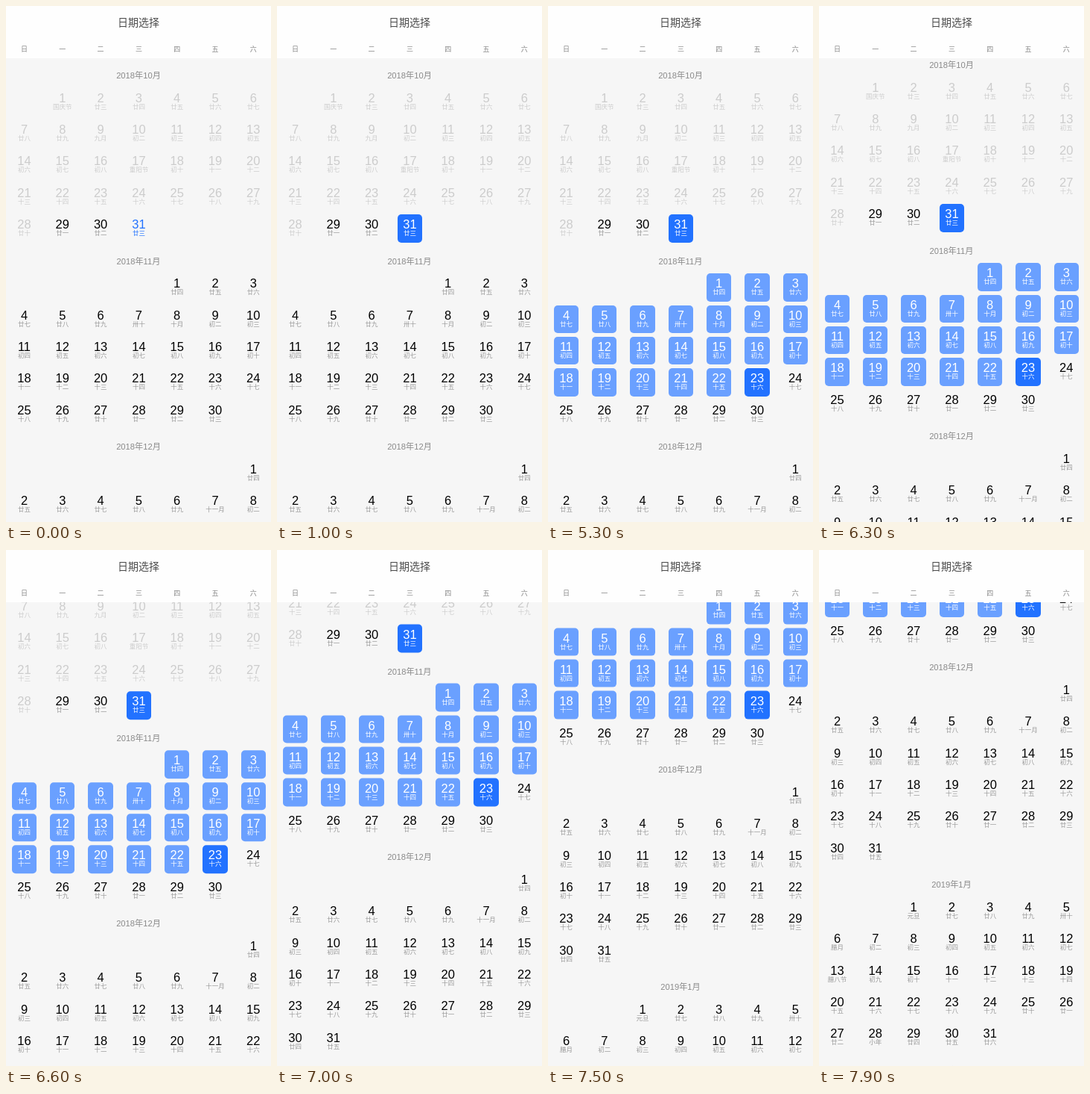
An HTML page that plays this animation: 356x691 px, repeating every 8 s.

```html
<!DOCTYPE html>
<html lang="zh-CN">
<head>
<meta charset="utf-8">
<style>
  html, body { margin: 0; width: 100%; height: 100%; overflow: hidden; background: #f6f6f6; }
  body { position: relative; font-family: "Liberation Sans", "Noto Sans CJK SC", "Noto Sans CJK", sans-serif; }
  div { position: absolute; text-align: center; white-space: nowrap; }
  #header { left: 0; top: 0; width: 356px; height: 70px; background: #fefefe; }
  #title { left: 0; width: 356px; top: 12px; font-size: 14px; line-height: 21px; color: #4c4c4c; }
  .weekday { width: 40px; top: 50px; font-size: 9px; line-height: 16px; color: #858585; }
  .month { left: 0; width: 356px; font-size: 11.2px; line-height: 16px; color: #8a8a8a; }
  .day { width: 33.4px; height: 37.5px; border-radius: 5px; color: #000; }
  .day b, .day i { position: absolute; left: -10px; right: -10px; font-weight: 400; font-style: normal; }
  .day b { top: 4px; font-size: 16.5px; line-height: 19px; }
  .day i { top: 19px; font-size: 8.5px; line-height: 12px; color: #999; }
  .past, .past i { color: #ccc; }
  .today, .today i { color: #2272ff; }
  .range { background: #6aa0ff; }
  .end { background: #2272ff; }
  .range, .range i, .end, .end i { color: #fff; }
</style>
</head>
<body>
<div id="list"></div>
<div id="header"><div id="title">日期选择</div></div>
<script>
const LOOP = 8000, STEP = 100, TODAY = 30, LAST = 53;
const COL = 51.3, ROW = 42.4, FIRST_X = 24.5;
const list = document.getElementById('list');
const header = document.getElementById('header');

function add(parent, className, left, top, html) {
  const el = document.createElement('div');
  el.className = className;
  if (left !== null) el.style.left = left + 'px';
  if (top !== null) el.style.top = top + 'px';
  el.innerHTML = html;
  parent.append(el);
  return el;
}

// Lunar day names, counted from lunar day 22 on 1 October 2018
const holidays = { 0: '国庆节', 16: '重阳节', 92: '元旦', 104: '腊八节', 119: '小年' };
const lunarMonths = [['八月', 29], ['九月', 30], ['十月', 29], ['十一月', 30], ['腊月', 30], ['正月', 29]];
function lunarName(index) {
  if (holidays[index]) return holidays[index];
  let n = index + 22, m = 0;
  while (n > lunarMonths[m][1]) n -= lunarMonths[m++][1];
  if (n === 1) return lunarMonths[m][0];
  return (n <= 10 ? '初' : '初十廿卅'[Math.floor(n / 10)]) + '十一二三四五六七八九'[n % 10];
}

[...'日一二三四五六'].forEach((name, i) => add(header, 'weekday', FIRST_X + COL * i - 20, null, name));

const days = [];
let titleY = 93, column = 1;
for (const [year, month, length] of [[2018, 10, 31], [2018, 11, 30], [2018, 12, 31], [2019, 1, 31], [2019, 2, 28]]) {
  add(list, 'month', null, titleY - 8, `${year}年${month}月`);
  for (let d = 0; d < length; d++) {
    const slot = column + d;
    const x = FIRST_X + COL * (slot % 7);
    const y = titleY + 30 + ROW * Math.floor(slot / 7);
    days.push(add(list, 'day', x - 16.7, y - 13.5, `<b>${d + 1}</b><i>${lunarName(days.length)}</i>`));
  }
  const rows = Math.ceil((column + length) / 7);
  titleY += 79 + ROW * (rows - 1);
  column = (column + length) % 7;
}

function dayClass(i, picked) {
  if (i < 28) return 'day past';
  if (picked > 0 && i === TODAY || picked > 1 && i === LAST) return 'day end';
  if (picked > 1 && i > TODAY && i < LAST) return 'day range';
  return i === TODAY ? 'day today' : 'day';
}

// A finger drag: soft start and stop with a nearly steady middle
function drag(t, start, duration, distance, power = 1) {
  const p = Math.min(1, Math.max(0, (t - start) / duration)) ** power;
  return distance * (0.43 * p + 0.57 * p * p * (3 - 2 * p));
}

let shown = -1;
function draw() {
  const t = Math.floor(performance.now() % LOOP / STEP) * STEP;
  const picked = t < 1000 ? 0 : t < 4400 ? 1 : 2;
  if (picked !== shown) {
    days.forEach((el, i) => { el.className = dayClass(i, picked); });
    shown = picked;
  }
  const scroll = drag(t, 6200, 800, 179.5) + drag(t, 7100, 800, 253.5, 1.09);
  list.style.transform = `translateY(${-scroll}px)`;
  requestAnimationFrame(draw);
}
draw();
</script>
</body>
</html>
```
